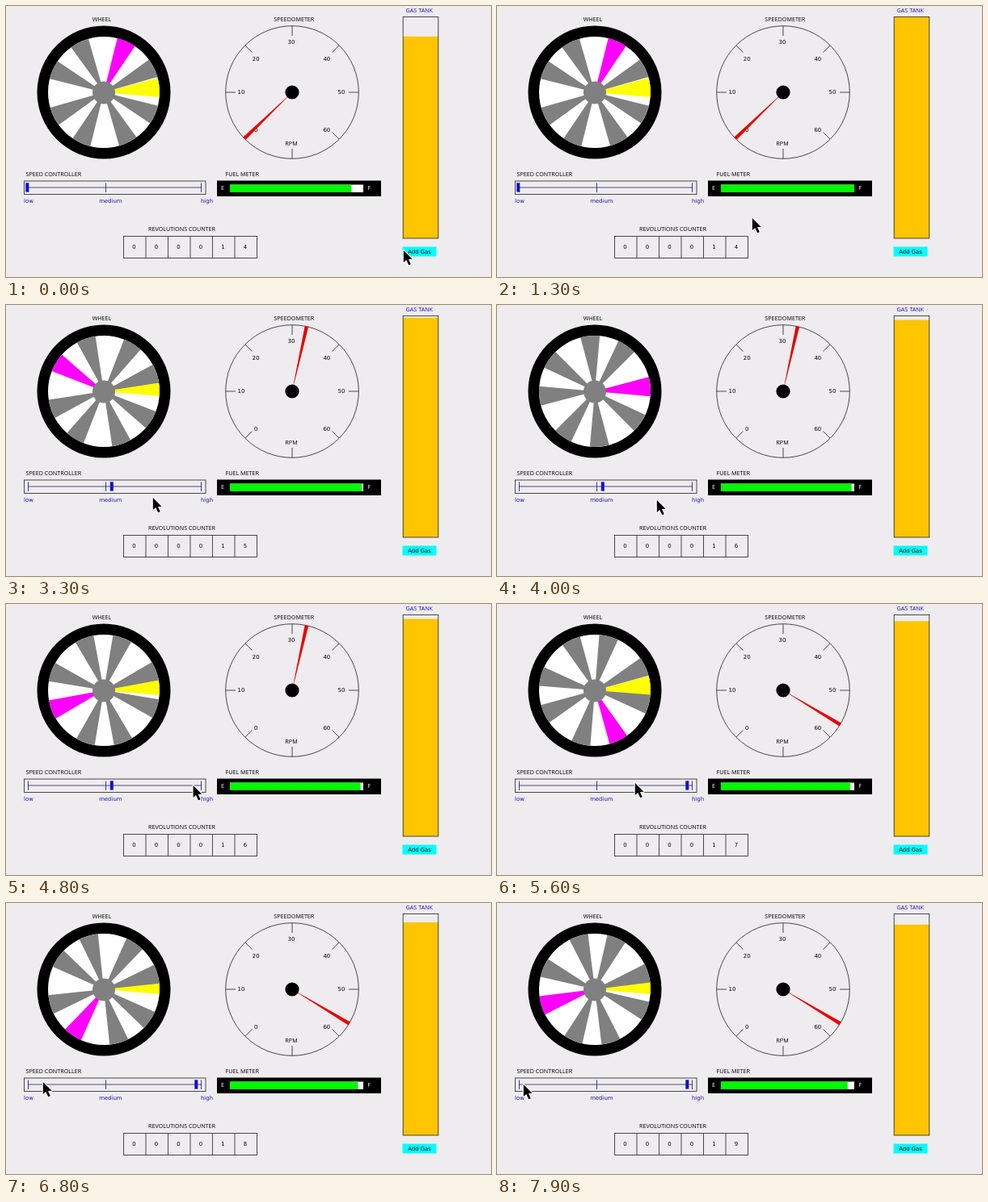
Animation, 600 px wide and 336 px high, one loop 8000 ms. Source, as an HTML page with a canvas:

```html
<!DOCTYPE html>
<html lang="en">
<head>
<meta charset="utf-8">
<title>Wheel dashboard</title>
<style>
html, body { margin: 0; width: 100%; height: 100%; overflow: hidden; background: #eeecee; }
canvas { display: block; }
</style>
</head>
<body>
<canvas id="stage" width="600" height="336"></canvas>
<script>
const ctx = document.getElementById('stage').getContext('2d');
const LOOP = 8000, STEP = 100;
const CAPS = '7.2px "Open Sans", "Noto Sans", sans-serif';
const BODY = '6.9px "DejaVu Sans", Verdana, sans-serif';
const PAGE = '#eeecee', BLUE = '#1a12b4', GRAY = '#808080', LINE = '#2c2c2c';
const REFILL = 500, MEDIUM = 1950, HIGH = 4900;

// Key points: time in ms, then values
const spin = [[MEDIUM, 66], [HIGH, -540], [6800, -1204], [7900, -1603]];
const pointer = [[0, 491, 302], [800, 500, 302], [1800, 130, 222], [2500, 130, 222],
  [3300, 181, 238], [4000, 197, 241], [HIGH, 235, 222], [5600, 170, 221],
  [6800, 45, 221], [7900, 32, 224]];

const rad = deg => -deg * Math.PI / 180;
const polar = (x, y, r, deg) => [x + r * Math.cos(rad(deg)), y + r * Math.sin(rad(deg))];

function sample(keys, t) {
  let i = 0;
  while (i < keys.length - 2 && t > keys[i + 1][0]) i++;
  const a = keys[i], b = keys[i + 1];
  const k = Math.max(0, Math.min(1, (t - a[0]) / (b[0] - a[0])));
  return a.slice(1).map((v, n) => v + (b[n + 1] - v) * k);
}

function rect(x, y, w, h, color) {
  ctx.fillStyle = color;
  ctx.fillRect(x, y, w, h);
}

function frame(x, y, w, h) {
  ctx.strokeStyle = LINE;
  ctx.strokeRect(x, y, w, h);
}

function line(x1, y1, x2, y2, color = LINE) {
  ctx.strokeStyle = color;
  ctx.beginPath();
  ctx.moveTo(x1, y1);
  ctx.lineTo(x2, y2);
  ctx.stroke();
}

function disc(x, y, r, color) {
  ctx.fillStyle = color;
  ctx.beginPath();
  ctx.arc(x, y, r, 0, Math.PI * 2);
  ctx.fill();
}

function poly(points, color) {
  ctx.fillStyle = color;
  ctx.beginPath();
  points.forEach(p => ctx.lineTo(p[0], p[1]));
  ctx.closePath();
  ctx.fill();
}

function text(s, x, y, color = '#000', font = BODY, align = 'center') {
  ctx.font = font;
  ctx.textAlign = align;
  ctx.fillStyle = color;
  ctx.fillText(s, x, y);
}

function wedge(mid, color) {
  ctx.fillStyle = color;
  ctx.beginPath();
  ctx.moveTo(121, 107);
  ctx.arc(121, 107, 69, rad(mid + 10), rad(mid - 10));
  ctx.closePath();
  ctx.fill();
}

function drawWheel(angle) {
  text('WHEEL', 118.5, 18.7, '#000', CAPS);
  disc(121, 107, 82.5, '#000');
  disc(121, 107, 69, '#fff');
  wedge(5, '#ff0');
  // Spokes come in pairs, one pair per quarter turn
  for (let q = 0; q < 360; q += 90) {
    wedge(angle - q, q ? GRAY : '#f0f');
    wedge(angle - q - 40, GRAY);
  }
  disc(121, 107.5, 14, GRAY);
}

function drawDial(rpm) {
  const x = 354, y = 107;
  text('SPEEDOMETER', 356.3, 18.7, '#000', CAPS);
  ctx.strokeStyle = LINE;
  ctx.beginPath();
  ctx.arc(x, y, 82.3, 0, Math.PI * 2);
  ctx.stroke();
  for (let i = 0; i < 8; i++) {
    const a = 225 - i * 45;
    line(...polar(x, y, 70, a), ...polar(x, y, 82, a));
    if (i < 7) {
      const [lx, ly] = polar(353, i % 2 ? 106.5 : 109.3, 62, a);
      text(i * 10, lx, ly + 2.4);
    }
  }
  text('RPM', 353, 172.5, '#000', CAPS);
  const a = 225 - rpm * 4.5, spread = 1.6;
  poly([[x, y], polar(x, y, 82.5, a - spread), polar(x, y, 82.5, a + spread)], '#e80000');
  disc(x, y, 8.6, '#000');
}

function drawSlider(x) {
  text('SPEED CONTROLLER', 24.5, 211.2, '#000', CAPS, 'left');
  frame(22.5, 217, 224.5, 16.5);
  line(27, 225, 242, 225, '#333366');
  [27.5, 123.5, 241.5].forEach(v => line(v, 219.5, v, 231, BLUE));
  rect(x, 219.3, 4, 11.3, '#1010d0');
  text('low', 22, 244, BLUE, BODY, 'left');
  text('medium', 129.3, 244, BLUE);
  text('high', 241, 244, BLUE, BODY, 'left');
}

function drawFuel(level) {
  text('FUEL METER', 271.5, 211.2, '#000', CAPS, 'left');
  rect(261, 216.5, 203, 19.5, '#000');
  rect(277, 221.5, 165, 9.5, '#fff');
  rect(277, 221.5, 165 * level, 9.5, '#00f800');
  text('E', 268, 228, '#fff', CAPS);
  text('F', 449, 228, '#fff', CAPS);

  text('GAS TANK', 511.3, 7.8, BLUE, CAPS);
  const h = 275 * level;
  rect(491, 288 - h, 44, h, '#fec500');
  frame(491.2, 13.4, 43.6, 274.6);
  rect(490.5, 298.5, 42, 12, '#0ff');
  text('Add Gas', 511.5, 307);
}

function drawCounter(n) {
  const cell = 27.5;
  text('REVOLUTIONS COUNTER', 217.5, 279.2, '#000', CAPS);
  frame(145.5, 285.5, cell * 6, 27);
  String(n).padStart(6, '0').split('').forEach((d, i) => {
    const x = 145.5 + i * cell;
    if (i) line(x, 285.5, x, 312.5);
    text(d, x + 12.9, 301.4);
  });
}

function drawPointer(x, y) {
  ctx.save();
  ctx.translate(x, y);
  ctx.lineJoin = 'round';
  const shape = [[0.8, 1], [0.8, 16], [4.3, 12.9], [7.2, 19.3],
    [9.8, 18.2], [7, 12], [11.6, 11.7]];
  ctx.beginPath();
  shape.forEach(p => ctx.lineTo(p[0], p[1]));
  ctx.closePath();
  ctx.strokeStyle = '#fff';
  ctx.lineWidth = 2.2;
  ctx.stroke();
  ctx.fillStyle = '#000';
  ctx.fill();
  ctx.restore();
}

function draw(t) {
  const [angle] = sample(spin, t);
  // A turn counts, and burns one percent, when the pink spoke reaches 5 degrees
  const turns = Math.floor((365 - angle) / 360);
  const gear = (t >= MEDIUM) + (t >= HIGH);
  rect(0, 0, 600, 336, PAGE);
  ctx.lineWidth = 0.85;
  drawWheel(angle);
  drawDial([0.2, 32.8, 56.9][gear]);
  drawSlider(24.3 + gear * 104.5);
  drawFuel(t < REFILL ? 0.91 : 1 - turns / 100);
  drawCounter(14 + turns);
  drawPointer(...sample(pointer, t));
}

function tick() {
  const t = performance.now() % LOOP;
  draw(Math.floor(t / STEP) * STEP);
  requestAnimationFrame(tick);
}
tick();
</script>
</body>
</html>
```
